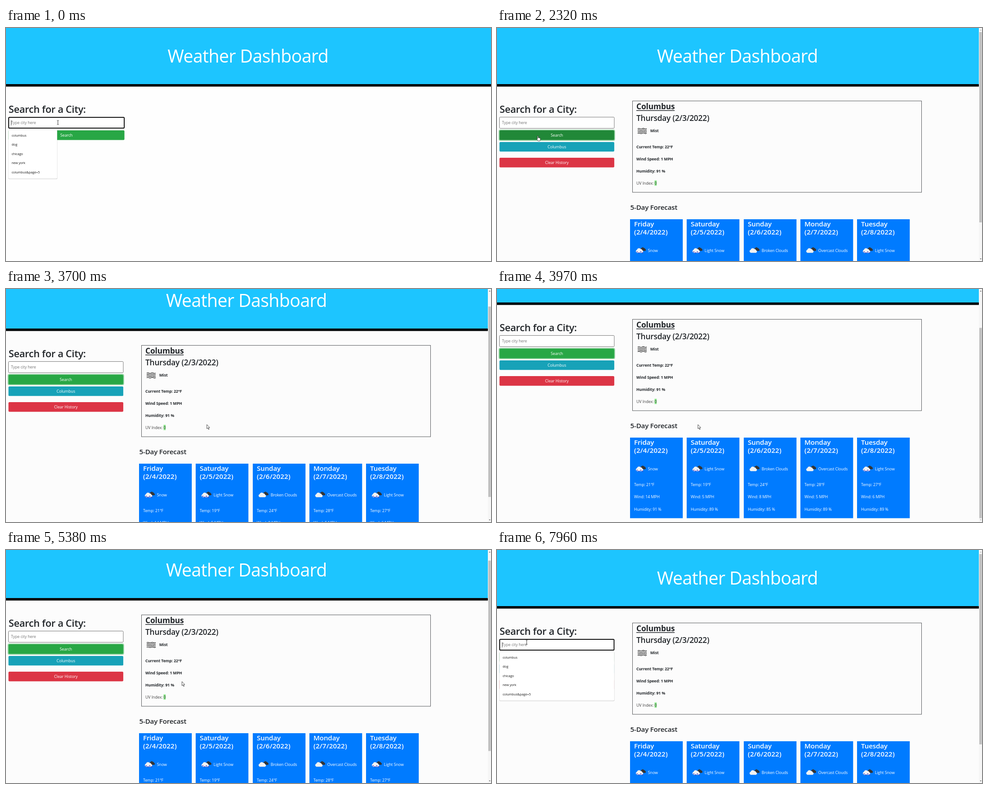
Write an HTML page that moves like this. It is 1079 px wide and 519 px high and loops after 8 s.

```html
<!DOCTYPE html>
<html lang="en">
<head>
<meta charset="utf-8">
<title>Weather Dashboard</title>
<style>
  html, body { margin: 0; width: 100%; height: 100%; overflow: hidden; background: #fdfdfd; }
  svg { display: block; width: 1079px; height: 519px; }
  text { font-family: "Open Sans", "Noto Sans", sans-serif; letter-spacing: -0.008em; white-space: pre; }
  .title { letter-spacing: -0.017em; }
  .head { letter-spacing: -0.014em; }
  .date { letter-spacing: 0.012em; }
</style>
</head>
<body>
<svg id="stage" viewBox="0 0 1079 519" xmlns="http://www.w3.org/2000/svg"></svg>
<script>
const LOOP = 8000;
const INK = '#212529';
const MAX_SCROLL = 95;
const stage = document.getElementById('stage');

// Bursts of screen refreshes: [first, last, count]
const BURSTS = [
  [260, 770, 5], [1200, 1620, 4], [2020, 2320, 3], [3310, 4210, 8],
  [4640, 5650, 8], [5770, 6670, 7], [6820, 7690, 7]
];

// Pointer stops: [time, x, y]
const POINTER = [
  [200, 115.5, 210.5], [640, 91, 240], [3170, 91, 240], [3696, 447, 302], [4500, 447, 302],
  [5073, 402, 294], [5361, 391.5, 293], [6370, 219, 247], [6670, 150, 175], [7255, 66, 205.5]
];

const DAYS = [
  ['Friday', 'Snow', 21, 14, 91],
  ['Saturday', 'Light Snow', 19, 5, 89],
  ['Sunday', 'Broken Clouds', 24, 8, 85],
  ['Monday', 'Overcast Clouds', 28, 5, 89],
  ['Tuesday', 'Light Snow', 27, 6, 89]
];

const RECENT = ['columbus', 'dog', 'chicago', 'new york', 'columbus&amp;page=5'];

const clamp = v => Math.max(0, Math.min(1, v));
const ramp = (t, from, to) => clamp((t - from) / (to - from));

// Holds the picture until the next refresh
function refreshTime(t) {
  const burst = BURSTS.filter(b => b[0] <= t).pop();
  if (!burst) return 0;
  const [first, last, count] = burst;
  const step = (last - first) / (count - 1);
  return Math.min(last, first + Math.floor((t - first) / step + 1e-6) * step);
}

function pointerAt(t) {
  const next = POINTER.findIndex(p => p[0] > t);
  if (next < 0) return POINTER[POINTER.length - 1].slice(1);
  if (next === 0) return POINTER[0].slice(1);
  const [a, b] = [POINTER[next - 1], POINTER[next]];
  const p = ramp(t, a[0], b[0]);
  return [a[1] + (b[1] - a[1]) * p, a[2] + (b[2] - a[2]) * p];
}

const scrollAt = t => MAX_SCROLL * (ramp(t, 3560, 3909) - ramp(t, 5110, 5420));

const mix = (from, to, p) => `rgb(${from.map((v, i) => Math.round(v + (to[i] - v) * p))})`;

const rect = (x, y, w, h, fill, more = '') =>
  `<rect x="${x}" y="${y}" width="${w}" height="${h}" fill="${fill}" ${more}/>`;

const text = (x, y, size, str, fill = INK, weight = 400, more = '') =>
  `<text x="${x}" y="${y}" font-size="${size}" fill="${fill}" font-weight="${weight}" ${more}>${str}</text>`;

const heading = (x, y, size, str) => text(x, y, size, str, INK, 600, 'class="head"');

const path = (d, fill, more = '') => `<path d="${d}" fill="${fill}" ${more}/>`;

const inside = (x, y, l, t, r, b) => x >= l && x <= r && y >= t && y <= b;

const CLOUD = 'M4 13a4 4 0 0 1 0-7.6a5.5 5.5 0 0 1 9.5-2a4 4 0 0 1 4 3.2a3.3 3.3 0 0 1 0 6.4z';

function cloudIcon(x, y, snowy) {
  const flakes = [0, 1, 2, 3].map(i =>
    path(`M${2.5 + i * 4} ${11 + i % 2 * 2}h3m-1.5 -1.5v3`, 'none', 'stroke="#4b43c4" stroke-width="1.1"')).join('');
  return `<g transform="translate(${x} ${y})">
    ${path(CLOUD, '#343434', 'transform="translate(9.8 -.2) scale(.68)"')}
    ${path(CLOUD, '#f2f2f2', 'transform="translate(0 1.4) scale(.88)"')}
    ${snowy ? flakes : ''}</g>`;
}

function mistIcon(x, y) {
  const wave = i => `M${x} ${y + i * 3.4}q2.5 -1.8 5 -.2t5 0t5 0t5 -.2`;
  return path([0, 1, 2, 3].map(wave).join(''), 'none', 'stroke="#222" stroke-width="1.3"');
}

function forecastCard([day, sky, temp, wind, humid], i) {
  const x = Math.round(296.2 + i * 126.2);
  const facts = [`Temp: ${temp}°F`, `Wind: ${wind} MPH`, `Humidity: ${humid} %`];
  return rect(x, 426, 117.3, 179.5, '#007bff') +
    text(x + 9, 441.8, 15.1, day, '#fff', 600) +
    text(x + 9, 460.4, 15.1, `(2/${i + 4}/2022)`, '#fff', 600, 'class="date"') +
    cloudIcon(x + 11.8, 487.8, sky.includes('Snow')) +
    text(x + 39.8, 498.6, 8.8, sky, '#fff') +
    facts.map((f, k) => text(x + 9, 534.3 + k * 27.1, 8.8, f, '#fff')).join('');
}

function results() {
  const facts = ['Current Temp: 22°F', 'Wind Speed: 1 MPH', 'Humidity: 91 %'];
  return rect(301.5, 162.5, 643, 203.5, 'none', 'stroke="#55585b"') +
    text(310, 181, 17.4, 'Columbus', INK, 700) +
    rect(310, 183, 85.2, 1.5, INK) +
    heading(310, 207.3, 17.4, 'Thursday (2/3/2022)') +
    mistIcon(313, 224.5) +
    text(341, 231.8, 8.7, 'Mist', INK, 700) +
    facts.map((f, i) => text(310, 267.6 + i * 27.1, 8.7, f, INK, 700)).join('') +
    rect(350.5, 339.5, 4.8, 11.8, '#90ee90') +
    text(310, 349, 8.8, 'UV Index: ', '#444') +
    text(350.5, 349, 8.8, '0', '#333') +
    heading(296.5, 404.8, 15.2, '5-Day Forecast') +
    DAYS.map(forecastCard).join('');
}
const RESULTS = results();

function button(y, w, label, fill, ring) {
  const glow = ring ? rect(4.6, y - .9, w + 1.8, 23.2, 'none', 'rx="2.8" stroke="#93d3a2" stroke-width="1.8"') : '';
  return glow + rect(5.5, y, w, 21.4, fill, 'rx="2.2"') +
    text(5.5 + w / 2, y + 14.2, 8.9, label, '#fff', 400, 'text-anchor="middle"');
}

function field(w, focused, value) {
  const line = focused ? 2 : 1;
  const edge = `rx="1.8" stroke="${focused ? '#101010' : '#767676'}" stroke-width="${line}"`;
  return rect(5 + line / 2, 198 + line / 2, w + 1 - line, 26 - line, value ? '#e8f0fe' : '#fff', edge) +
    text(11, 214.3, 8.8, value || 'Type city here', value ? '#222' : '#757575') +
    (focused && !value ? rect(11, 205.5, .8, 11.5, '#222') : '');
}

function dropdown(w, hot) {
  return rect(5.2, 226.2, w + .8, 110.4, '#000', 'rx="2" opacity=".2"') +
    rect(5.5, 225, w, 110.6, '#fff', 'rx="2"') +
    (hot ? rect(5.5, 229, w, 20.4, '#ececec') : '') +
    RECENT.map((r, i) => text(12.4, 242 + i * 20.4, 7.3, r, '#1a1a1a')).join('');
}

function scrollbar(offset) {
  const dim = '#a3a3a3', dark = '#505050';
  return rect(1072, 0, 7, 519, '#f6f6f6') +
    rect(1073, 9 + offset * 501 / 614, 5.6, 424, '#c1c1c1') +
    path('M1074.3 5.6l1.8-2.2l1.8 2.2z', offset ? dark : dim) +
    path('M1074.3 513.4l1.8 2.2l1.8-2.2z', offset < MAX_SCROLL ? dark : dim);
}

const CURSORS = {
  arrow: path('M0 0v9.2l2.1-1.9l1.5 3.6l1.5-.6l-1.5-3.5h2.8z', '#fff', 'stroke="#222" stroke-width=".8"'),
  beam: path('M-2 -4.6h1.5l.5 .5l.5-.5h1.5M0 -4.1v8.2M-2 4.6h1.5l.5-.5l.5 .5h1.5', 'none', 'stroke="#222" stroke-width=".9"'),
  hand: path('M-1 .9q0-1 .9-1t.9 1v3.7q1.4-.7 1.7.3q1.3-.5 1.6.4q1.4-.2 1.4 1.1v2q0 1.7-1 3.1h-4.3q-1.5-2.2-2.9-4.4q.2-1.2 1.7.2z',
    '#fff', 'stroke="#222" stroke-width=".8"')
};

function render(now) {
  const t = refreshTime(now % LOOP);
  const found = t >= 2170;
  const focused = t < 1340 || t >= 7540;
  const open = t < 1200 || t >= 7690;
  const hot = t >= 640 && t < 1200;
  const value = hot || (t >= 1200 && !found) ? 'columbus' : '';
  const scroll = scrollAt(t);
  const [px, py] = pointerAt(t);
  const pageW = found ? 1072 : 1079;
  const w = found ? 255.4 : 258;

  const over = (l, top, r, b) => inside(px, py + scroll, l, top, r, b);
  const overButton = y => !open && over(5.5, y, 5.5 + w, y + 21.4);
  const overSearch = overButton(228);
  const overCity = found && overButton(254);
  const overClear = found && overButton(289);
  const overText = over(5, 165, 263, 224) || (found && over(296, 386, 403, 412));
  const shape = overSearch || overCity || overClear ? 'hand' : overText ? 'beam' : 'arrow';
  const green = mix([40, 167, 69], [33, 136, 56], overSearch ? ramp(t, 1200, 1480) : 0);

  const page =
    rect(0, 0, pageW, 125, '#1dc5ff') + rect(0, 125, pageW, 5.5, '#000') +
    text(pageW / 2 - 1.1, 77, 39.4, 'Weather Dashboard', '#fff', 400, 'class="title" text-anchor="middle"') +
    heading(5.8, 189, 21.8, 'Search for a City:') +
    field(w, focused, value) +
    button(228, w, 'Search', green, t >= 2020 && t < 7540) +
    (found ? button(253.9, w, 'Columbus', overCity ? '#138496' : '#17a2b8') +
      button(289, w, 'Clear History', overClear ? '#c82333' : '#dc3545') + RESULTS : '') +
    (open ? dropdown(found ? w : 108.3, hot) : '');

  stage.innerHTML = rect(0, 0, 1079, 519, found ? '#fcfcfc' : '#fefefe') +
    `<g transform="translate(0 ${-scroll})">${page}</g>` +
    (found ? scrollbar(scroll) : '') +
    `<g transform="translate(${px} ${py})">${CURSORS[shape]}</g>`;
}

const start = performance.now();
function loop() {
  render(performance.now() - start);
  requestAnimationFrame(loop);
}
loop();
</script>
</body>
</html>
```
